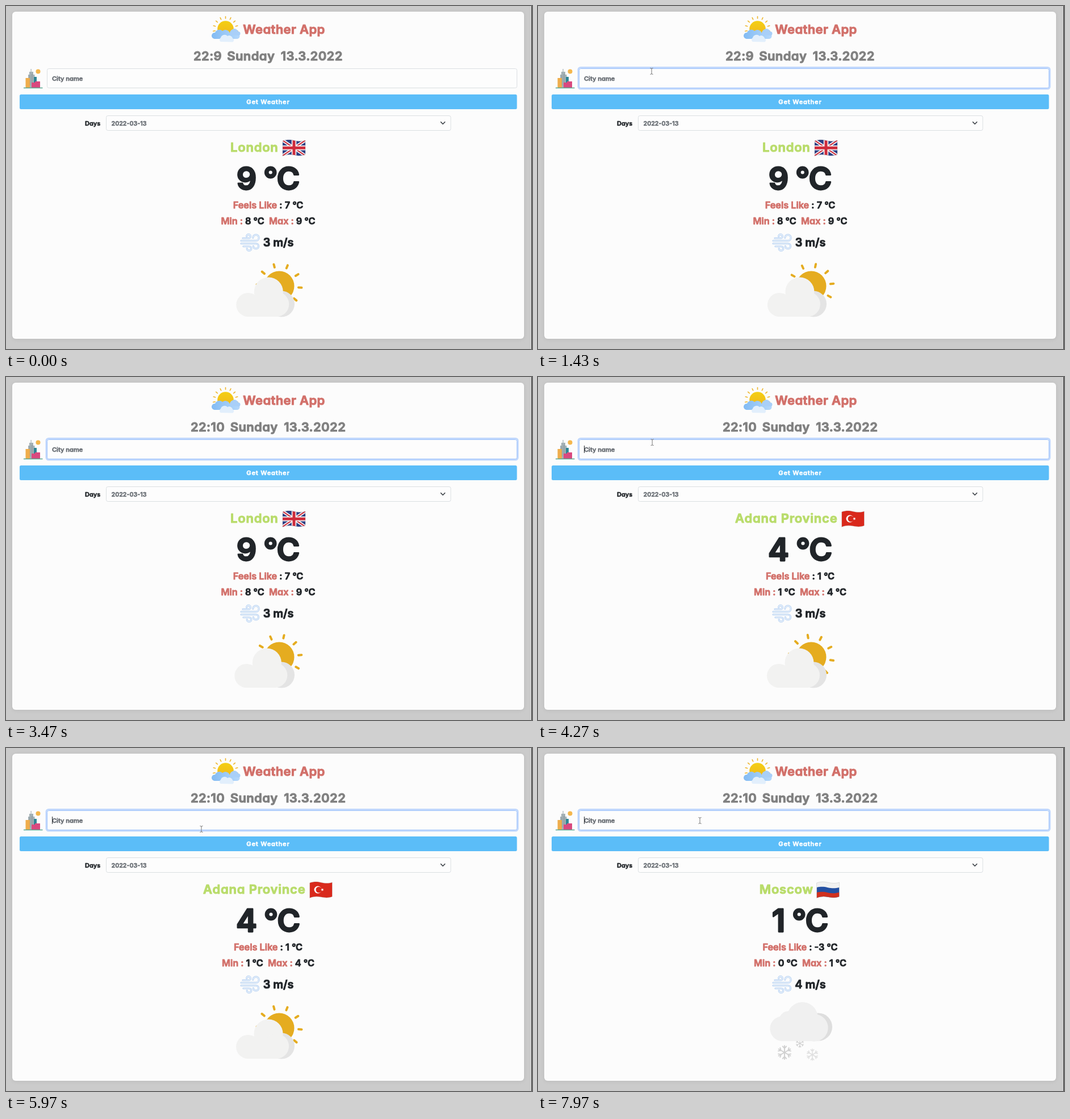
These frames come from a looping animation (926x605 px, 8000 ms). An HTML page:

```html
<!DOCTYPE html>
<html lang="en">
<head>
<meta charset="utf-8">
<title>Weather App</title>
<style>
  html, body { margin: 0; width: 100%; height: 100%; overflow: hidden; background: #cbcbcb; }
  svg { display: block; width: 100%; height: 100%; }
  text {
    font: 600 16px Inter, Lato, sans-serif;
    font-feature-settings: "cv11";
    fill: #212529;
    stroke: #212529;
    stroke-width: .05em;
    stroke-linejoin: round;
    white-space: pre;
  }
  .mid { text-anchor: middle; }
  .head { font-size: 22px; letter-spacing: .4px; }
  .small { font-size: 11px; }
  .line { font-size: 16.3px; }
  .red { fill: #d2706a; stroke: #d2706a; }
  .gray { fill: #808080; stroke: #808080; }
  .muted { fill: #6b7076; stroke: #6b7076; }
  .green { fill: #b9dc6b; stroke: #b9dc6b; }
  .white { fill: #fff; stroke: #fff; }
</style>
</head>
<body>
<svg viewBox="0 0 926 605" preserveAspectRatio="none">
  <defs>
    <linearGradient id="blue" x2="1"><stop stop-color="#82bbf3"/><stop offset="1" stop-color="#b5d8fb"/></linearGradient>
    <linearGradient id="gold" x2="0" y2="1"><stop stop-color="#f4cf14"/><stop offset="1" stop-color="#f0b51c"/></linearGradient>
    <filter id="soft" x="-5%" y="-5%" width="110%" height="110%"><feGaussianBlur stdDeviation="3"/></filter>
    <clipPath id="wave"><path d="M0 2C9-1 14 0 20 1.2S32 3.5 40 1V26C32 29 27 28 20 26.8S8 25.5 0 28.5Z"/></clipPath>
    <g id="puffs"><circle cx="424" cy="527" r="21"/><circle cx="460" cy="504" r="25.5"/><circle cx="474" cy="526" r="22"/><rect x="422" y="515" width="54" height="33"/></g>
    <g id="curls" fill="none" stroke-linecap="round">
      <path d="M414 414H440a5.2 5.2 0 1 0-5.2-5.2"/>
      <path d="M414 419H440a4.6 4.6 0 1 1-4.6 4.6"/>
      <path d="M418 424H428a3.8 3.8 0 1 1-3.8 3.8"/>
      <path d="M417 409.5H427a3.3 3.3 0 1 0-3.3-3.3"/>
    </g>
  </defs>

  <rect width="926" height="605" fill="#cbcbcb"/>
  <rect x="11" y="11" width="901" height="577" rx="6" fill="#aaa" opacity=".55" filter="url(#soft)"/>
  <rect x="11" y="10" width="901" height="577" rx="6" fill="#fcfcfc"/>
  <rect x="925" width="1" height="605" fill="#2a2a2a"/>

  <!-- title -->
  <g id="rays0" stroke="#eeb52c" stroke-width="1.6" stroke-linecap="round"></g>
  <circle cx="386.5" cy="40.5" r="14.3" fill="url(#gold)"/>
  <path d="M367 58a5.5 5.5 0 0 1 1-11 8 8 0 0 1 13-3 8 8 0 0 1 13 4 6 6 0 0 1 12 0 5 5 0 0 1 1 10Z" fill="url(#blue)"/>
  <path d="M395 51a7 7 0 0 1 4-10 7 7 0 0 1 10 4 3.5 3.5 0 0 1 0 7Z" fill="#a9cff8"/>
  <path d="M378 63a4 4 0 0 1 0-7 7 7 0 0 1 12-3 6 6 0 0 1 9 4 3.5 3.5 0 0 1 0 6.5Z" fill="#e2effc"/>
  <text x="489.5" y="49" class="mid head red">Weather App</text>

  <!-- clock -->
  <text id="clock" x="355" y="96" class="mid head gray"></text>
  <text id="weekday" y="96" class="mid head gray">Sunday</text>
  <text id="date" y="96" class="mid head gray">13.3.2022</text>

  <!-- skyline -->
  <circle cx="56.5" cy="115.5" r="4" fill="#f4b74c"/>
  <path d="M43.5 111h1.2v5h3.3v5h2.5v23H39v-23h2v-5h2.5Z" fill="#a4b1b5"/>
  <path d="M45 120h1.5v20H45ZM41.500 122h1.200v18h-1.200Z" fill="#8a999f"/>
  <rect x="49" y="125" width="5" height="10" fill="#2f8796"/>
  <rect x="34.500" y="127" width="7.500" height="17" fill="#efad4c"/>
  <path d="M45 135h6v-2h9v11H45Z" fill="#d9497f"/>
  <path d="M31 144.500h33.500" stroke="#5aa791" stroke-width="1.500"/>

  <!-- form -->
  <rect id="ring" x="71" y="108.500" width="830" height="37.500" rx="4" fill="none" stroke="#c1d8fd" stroke-width="3"/>
  <rect id="field" x="72.500" y="110.500" width="827" height="34" rx="3" fill="#fdfdfd"/>
  <text id="entry" x="81" y="131.500" class="small"></text>
  <path id="caret" d="M0 121v13" stroke="#212529"/>
  <rect x="24" y="156" width="875.500" height="26" rx="2.500" fill="#5bbdf8"/>
  <text x="461.500" y="173" class="mid small white" style="letter-spacing:.85px">Get Weather</text>
  <text x="139" y="211" class="small">Days</text>
  <rect x="176.500" y="193.500" width="606.500" height="26" rx="3" fill="#fdfdfd" stroke="#dbdfe2"/>
  <text x="185.500" y="210.500" class="muted" style="font-size:10.700px">2022-03-13</text>
  <path d="M765.500 204.500l3.600 3.800 3.600-3.800" fill="none" stroke="#343a40" stroke-width="1.500" stroke-linecap="round" stroke-linejoin="round"/>

  <!-- report -->
  <text id="city" x="437.300" y="257" class="mid green" style="font-size:22px;letter-spacing:.8px"></text>
  <g id="flag"><g clip-path="url(#wave)">
    <g id="uk">
      <path d="M0 0h40v29H0Z" fill="#2c3f85"/>
      <path d="M0 1 40 28M40 1 0 28" stroke="#f4f4f4" stroke-width="5.500"/>
      <path d="M0 1 40 28M40 1 0 28" stroke="#cf2c3c" stroke-width="2"/>
      <path d="M20 0v29M0 14.200h40" stroke="#f4f4f4" stroke-width="8.500"/>
      <path d="M20 0v29M0 14.200h40" stroke="#cf2c3c" stroke-width="5"/>
    </g>
    <g id="tr">
      <path d="M0 0h40v29H0Z" fill="#d9291c"/>
      <circle cx="14.500" cy="14" r="6.500" fill="#fff"/>
      <circle cx="16.200" cy="14" r="5.200" fill="#d9291c"/>
      <path d="M19.500 14l2-.7v-2.100l1.300 1.700 2-.7-1.200 1.800 1.200 1.800-2-.7-1.300 1.700v-2.100Z" fill="#fff"/>
    </g>
    <g id="ru">
      <path d="M0 0h40v11H0Z" fill="#f1f1f1"/>
      <path d="M0 10C9 8 14 9 20 10.200S32 12 40 10v19H0Z" fill="#2450a2"/>
      <path d="M0 19C9 17 14 18 20 19.200S32 21 40 18.500V29H0Z" fill="#d0301f"/>
    </g>
  </g><path d="M0 2C9-1 14 0 20 1.200S32 3.500 40 1V26C32 29 27 28 20 26.800S8 25.500 0 28.500Z" fill="none" stroke="#888" stroke-opacity=".35" stroke-width=".7"/></g>
  <text id="temp" x="461" y="324" class="mid" style="font-size:55.500px;letter-spacing:-.02em"></text>
  <text x="461.500" y="357" class="mid line"><tspan class="red">Feels Like</tspan><tspan id="feels"></tspan></text>
  <text x="461.500" y="385" class="mid line"><tspan class="red">Min :</tspan><tspan id="low"></tspan><tspan class="red">Max :</tspan><tspan id="high"></tspan></text>
  <use href="#curls" stroke="#b6d1f2" stroke-width="3.200"/>
  <use href="#curls" stroke="#f5f9fe" stroke-width="1.100"/>
  <text id="wind" x="479.500" y="423.500" class="mid" style="font-size:19.800px"></text>

  <!-- weather icons -->
  <g id="sunny">
    <g id="rays" stroke="#e5ac20" stroke-width="4" stroke-linecap="round"></g>
    <circle cx="481" cy="494" r="26.500" fill="#e5ac20"/>
    <g id="back" fill="#e4e4e4"><circle cx="485" cy="525.500" r="23"/></g>
    <use id="front" href="#puffs" fill="#f2f2f1"/>
  </g>
  <g id="snowy">
    <circle cx="493.500" cy="492" r="24.500" fill="#dedede"/>
    <path id="snowcloud" d="M429 517a22 22 0 0 1-3-43.500 18 18 0 0 1 15-9.500 27 27 0 0 1 51 6 24 24 0 0 1-11 47Z" fill="#f0f0f0"/>
    <g id="flakes" fill="none" stroke-linecap="round"></g>
  </g>

  <!-- pointers -->
  <path id="beam" d="M-2.500-5.500Q0-5.500 0-4 0-5.500 2.500-5.500M0-4V4M-2.500 5.500Q0 5.500 0 4 0 5.500 2.500 5.500" fill="none" stroke="#777"/>
  <path id="arrow" d="M0 0V12l2.800-2.500 2 4.500 1.800-.8-2-4.400h3.800Z" fill="#222" stroke="#fff" stroke-width=".8"/>
  <path id="hand" d="M-2.500-6q1.300-1.200 2 .3V-1l4 1q1.500.5 1.300 2L4 6H-1.500L-5 1.500q0-1.500 1.500-.8l1 .8Z" fill="#fff" stroke="#333" stroke-width=".9" stroke-linejoin="round"/>
</svg>

<script>
const LOOP = 8000;
const $ = id => document.getElementById(id);
const show = (id, on) => $(id).setAttribute('display', on ? 'inline' : 'none');
const attr = (id, name, value) => $(id).setAttribute(name, value);

const reports = [
  { from: 0, city: 'London', flag: 'uk', x: 487, temp: '9', feels: '7', low: '8', high: '9', wind: 3 },
  { from: 3700, city: 'Adana Province', flag: 'tr', x: 534.5, temp: '4', feels: '1', low: '1', high: '4', wind: 3 },
  { from: 7700, city: 'Moscow', flag: 'ru', x: 490.5, temp: '1', feels: '-3', low: '0', high: '1', wind: 4 }
];
const entries = [
  { word: 'adana', start: 1900, step: 210, clear: 3250 },
  { word: 'moscow', start: 6800, step: 100, clear: 7500 }
];
// time, x, y
const track = [
  [300, 190, -10], [600, 200, 115], [4250, 200, 115], [4800, 466, 174],
  [5600, 466, 174], [6200, 285, 128]
];
// x, y, radius, colour
const flakes = [[461, 521, 7, '#cfcfcf'], [434, 537, 12, '#d0d0d0'], [483, 541, 10, '#e0e0e0']];

function rays(cx, cy, r1, r2, count, step, first) {
  let d = '';
  for (let i = 0; i < count; i++) {
    const a = (first + i * step) * Math.PI / 180, c = Math.cos(a), s = Math.sin(a);
    d += `M${cx + r1 * c} ${cy + r1 * s}L${cx + r2 * c} ${cy + r2 * s}`;
  }
  return `<path d="${d}"/>`;
}

function flake([x, y, r, color]) {
  const arm = `<path d="M0 0V${-r}M${-r * .27} ${-r * .9}L0 ${-r * .6}L${r * .27} ${-r * .9}"/>`;
  let arms = '';
  for (let a = 0; a < 360; a += 60) arms += `<g transform="rotate(${a})">${arm}</g>`;
  return `<g transform="translate(${x} ${y})" stroke="${color}" stroke-width="${r * .16}">${arms}</g>`;
}

function pointerAt(t) {
  let i = track.findIndex(p => p[0] > t);
  if (i < 0) return track[track.length - 1].slice(1);
  if (i === 0) return track[0].slice(1);
  const [t0, x0, y0] = track[i - 1], [t1, x1, y1] = track[i];
  const k = (t - t0) / (t1 - t0), e = k * k * (3 - 2 * k);
  return [x0 + (x1 - x0) * e, y0 + (y1 - y0) * e];
}

function drawForm(t) {
  const focused = t >= 900;
  show('ring', focused);
  attr('field', 'stroke', focused ? '#9fc3fb' : '#dbdfe2');
  const e = entries.find(e => t >= e.start && t < e.clear);
  const typed = e ? e.word.slice(0, 1 + Math.floor((t - e.start) / e.step)) : '';
  const entry = $('entry');
  entry.textContent = typed || 'City name';
  entry.setAttribute('class', typed ? 'small' : 'small muted');
  const origin = t < 1900 ? 900 : t < 6500 ? 2880 : t < 7500 ? 6500 : 7500;
  const typing = e && t < e.start + e.step * e.word.length;
  show('caret', focused && (typing || Math.floor((t - origin) / 500) % 2 === 0));
  const end = typed ? 81 + entry.getComputedTextLength() : 81;
  attr('caret', 'transform', `translate(${Math.round(end) + .5})`);
}

function drawReport(t) {
  const r = reports.filter(r => t >= r.from).pop();
  $('city').textContent = r.city;
  attr('flag', 'transform', `translate(${r.x} 236)`);
  reports.forEach(o => show(o.flag, o === r));
  $('temp').textContent = `${r.temp} °C`;
  $('feels').textContent = ` : ${r.feels} °C`;
  $('low').textContent = ` ${r.low} °C  `;
  $('high').textContent = ` ${r.high} °C`;
  $('wind').textContent = `${r.wind} m/s`;

  const snow = r.flag === 'ru';
  show('sunny', !snow);
  show('snowy', snow);
  $('rays').innerHTML = rays(481, 494, 34, 39.5, 10, 36, 4 + t * .018);
  const sway = Math.cos((t + 200) / 6800 * 2 * Math.PI);
  attr('front', 'transform', `translate(${.8 + 1.5 * sway})`);
  attr('flakes', 'transform', `translate(0 ${(t - 7970) * .012})`);
}

function drawPointer(t) {
  const [x, y] = pointerAt(t);
  const hidden = t < 300 || (t > 2500 && t < 4250) || (t > 6800 && t < 7800);
  const inField = y > 110 && y < 145, onButton = y >= 156 && y <= 182;
  show('beam', !hidden && inField);
  show('hand', !hidden && onButton);
  show('arrow', !hidden && !inField && !onButton);
  for (const id of ['beam', 'hand', 'arrow']) attr(id, 'transform', `translate(${x} ${y})`);
}

function draw(t) {
  const late = t >= 3000;
  $('clock').textContent = late ? '22:10' : '22:9';
  attr('weekday', 'x', late ? 436.7 : 431.3);
  attr('date', 'x', late ? 543.7 : 538.3);
  drawForm(t);
  drawReport(t);
  drawPointer(t);
}

$('rays0').innerHTML = rays(386.5, 40.5, 18.5, 22, 9, 25, -190);
$('flakes').innerHTML = flakes.map(flake).join('');
$('snowy').insertBefore($('flakes'), $('snowy').firstChild);

const start = performance.now();
function tick() {
  draw((performance.now() - start) % LOOP);
  requestAnimationFrame(tick);
}
tick();
</script>
</body>
</html>
```
